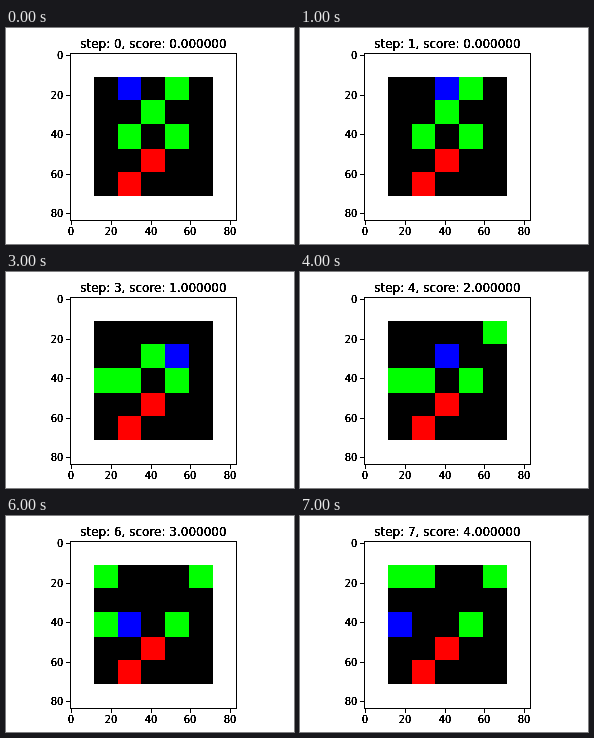
Animation of 288x216 px, one loop 8 s. Source, as an HTML page:

```html
<!DOCTYPE html>
<html lang="en">
<head>
<meta charset="utf-8">
<title>Grid walk</title>
<style>
  html, body { margin: 0; width: 100%; height: 100%; overflow: hidden; background: #fff; }
  svg { display: block; width: 288px; height: 216px; }
  rect { shape-rendering: crispEdges; }
  text { font: 10px "DejaVu Sans", sans-serif; fill: #000; filter: url(#harden); }
  #title { font-size: 12px; }
</style>
</head>
<body>
<svg viewBox="0 0 288 216">
  <!-- Turns soft glyph edges into solid pixels -->
  <filter id="harden" filterUnits="userSpaceOnUse" x="0" y="0" width="288" height="216">
    <feComponentTransfer><feFuncA type="linear" slope="4" intercept="-0.5"/></feComponentTransfer>
  </filter>
  <text id="title" x="147.4" y="20" text-anchor="middle"></text>
  <g id="board"></g>
  <g id="axes"></g>
</svg>
<script>
const STEP_MS = 1000;
const COLS = [88, 112, 135, 159, 183, 207];
const ROWS = [49, 72, 96, 121, 144, 168];
const WALK = [[1, 0], [2, 0], [3, 0], [3, 1], [2, 1], [2, 2], [1, 2], [0, 2]];
const FOOD = [[3, 0], [2, 1], [1, 2], [3, 2]];
const SPAWNS = [[0, 2], [4, 0], [0, 0], [1, 0]];
const TRAPS = [[2, 3], [1, 4]];

const board = document.getElementById('board');
const axes = document.getElementById('axes');
const title = document.getElementById('title');

function add(parent, tag, attrs, text = '') {
  const el = document.createElementNS('http://www.w3.org/2000/svg', tag);
  for (const key in attrs) el.setAttribute(key, attrs[key]);
  el.textContent = text;
  parent.append(el);
}

function box(parent, x, y, width, height, fill = '#000') {
  add(parent, 'rect', { x, y, width, height, fill });
}

function cell([c, r], fill) {
  box(board, COLS[c], ROWS[r], COLS[c + 1] - COLS[c], ROWS[r + 1] - ROWS[r], fill);
}

function drawAxes() {
  const left = 64, top = 25, right = 230, bottom = 192, tick = 4;
  box(axes, left, top, right - left + 1, 1);
  box(axes, left, bottom, right - left + 1, 1);
  box(axes, left, top, 1, bottom - top + 1);
  box(axes, right, top, 1, bottom - top + 1);
  for (let i = 0; i < 5; i++) {
    const x = Math.round(65.43 + 39.6 * i);
    const y = Math.round(26.91 + 39.6 * i);
    box(axes, x, bottom + 1, 1, tick);
    box(axes, left - tick, y, tick, 1);
    add(axes, 'text', { x, y: 207, 'text-anchor': 'middle' }, i * 20);
    add(axes, 'text', { x: 57.4, y: y + 4, 'text-anchor': 'end' }, i * 20);
  }
}

// Replays the walk up to a step; each eaten cell spawns the next one.
function stateAt(step) {
  const food = FOOD.slice();
  let score = 0;
  for (const [c, r] of WALK.slice(0, step + 1)) {
    const hit = food.findIndex(f => f[0] === c && f[1] === r);
    if (hit >= 0) food[hit] = SPAWNS[score++];
  }
  return { food, score };
}

function draw(step) {
  const { food, score } = stateAt(step);
  title.textContent = `step: ${step}, score: ${score.toFixed(6)}`;
  board.replaceChildren();
  box(board, COLS[0], ROWS[0], COLS[5] - COLS[0], ROWS[5] - ROWS[0]);
  food.forEach(f => cell(f, '#0f0'));
  TRAPS.forEach(t => cell(t, '#f00'));
  cell(WALK[step], '#00f');
}

let shown = -1;
function tick() {
  const step = Math.floor(performance.now() / STEP_MS) % WALK.length;
  if (step !== shown) draw(shown = step);
  requestAnimationFrame(tick);
}

drawAxes();
tick();
</script>
</body>
</html>
```
